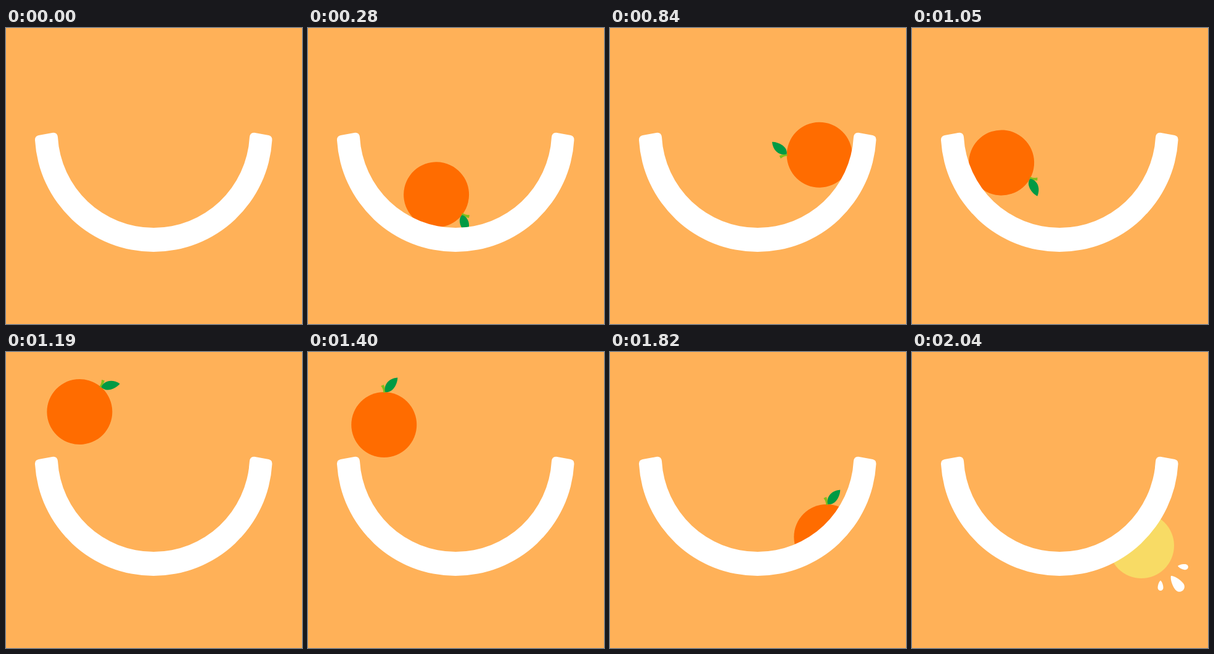
These frames come from a looping animation (480 by 480 pixels, 2.59 s). An HTML page:

```html
<!DOCTYPE html>
<html lang="en">
<head>
<meta charset="utf-8">
<title>Rolling orange</title>
<style>
  html, body { margin: 0; width: 100%; height: 100%; overflow: hidden; background: #ffb158; }
  svg { display: block; width: 100vw; height: 100vh; }
</style>
</head>
<body>
<svg viewBox="0 0 480 480">
  <defs>
    <!-- The fruit shows only above the smile or inside it, the juice only outside -->
    <clipPath id="inside">
      <path d="M0 0H480V168H414A174.5 174.5 0 0 1 65 168H0Z"/>
    </clipPath>
    <clipPath id="outside">
      <path d="M414 168A174.5 174.5 0 0 1 65 168V480H480V168Z"/>
    </clipPath>
    <path id="drop" d="M0 0C.08-.12 .42-.27 .7-.27C1.1-.27 1.1 .27 .7 .27C.42 .27 .08 .12 0 0Z"/>
  </defs>

  <g clip-path="url(#inside)">
    <g id="orange">
      <circle r="53" fill="#ff6c00"/>
      <path fill="#84bd1c" d="M-5-63L-.5-65Q2-60 2-52H-1Q-1-58-5-63Z"/>
      <path fill="#009a44" d="M2-53C-1-62 5-75 22-76.5C22-66 14-51 2-53Z"/>
    </g>
  </g>
  <g clip-path="url(#outside)">
    <circle id="juice" r="53" fill="#f8db65"/>
  </g>
  <path fill="#fff" d="M47 182Q46.5 175.3 53 174L75 170Q83 168.8 84 177
    A155.75 155.75 0 0 0 395 177Q396 168.8 404 170L426 174Q432 175.3 431.5 182
    A192.6 192.6 0 0 1 47 182Z"/>
  <g id="drops" fill="#fff">
    <use href="#drop"/>
    <use href="#drop"/>
    <use href="#drop"/>
  </g>
</svg>
<script>
  const LOOP = 2590, STEP = 70;
  const BURST = 1890, BURST_STEP = 50;

  // The fruit's centre rolls on this arc
  const ARC = { x: 239.5, y: 168, r: 107 };
  const DRIFT = 17;

  // Flights above one end of the smile; each lands in a roll to the other end
  const HOPS = [
    { from: -195, to: 171, side: -1, peak: -60, rollEnd: 440 },
    { from: 440, to: 807, side: 1, peak: 76, rollEnd: 1095 },
    { from: 1095, to: 1459, side: -1, peak: 76, rollEnd: 1790 }
  ];
  // At last the fruit slips behind the smile and turns to juice
  const SLIP = { from: 1680, to: 1870 };
  const JUICE = { x: 372, y: 314 };

  // Time and turn in degrees
  const TURNS = [[70, 0], [280, 126], [560, 472], [1050, 117], [1260, 0], [1400, 0], [1820, 360]];

  // Splash drops: tip x, tip y, angle, length
  const DROPS = [[431, 347, 8, 17], [420, 363, 52, 30.5], [403, 370.5, 90, 16.5]];

  const byId = id => document.getElementById(id);
  const orange = byId('orange'), juice = byId('juice'), drops = byId('drops');

  const part = (t, from, to) => (t - from) / (to - from);
  const mix = (a, b, u) => a + (b - a) * u;

  function fly({ side, peak }, u) {
    const lift = 4 * u * (1 - u);
    return { x: ARC.x + side * (ARC.r + DRIFT * lift), y: mix(ARC.y, peak, lift) };
  }

  function roll({ side }, u) {
    const a = Math.PI * u;
    return { x: ARC.x + side * ARC.r * Math.cos(a), y: ARC.y + ARC.r * Math.sin(a) };
  }

  function place(t) {
    if (t > SLIP.from) {
      const start = place(SLIP.from), u = part(t, SLIP.from, SLIP.to);
      return { x: mix(start.x, JUICE.x, u), y: mix(start.y, JUICE.y, u) };
    }
    const hop = HOPS.find(h => t < h.rollEnd);
    return t < hop.to
      ? fly(hop, part(t, hop.from, hop.to))
      : roll(hop, part(t, hop.to, hop.rollEnd));
  }

  function turnAt(t) {
    const i = TURNS.findIndex(([time]) => t <= time);
    if (i < 1) return 0;
    const [t0, a] = TURNS[i - 1], [t1, b] = TURNS[i];
    return mix(a, b, part(t, t0, t1));
  }

  function show(el, on) {
    el.setAttribute('visibility', on ? 'visible' : 'hidden');
  }

  function drawOrange(time) {
    const t = Math.floor(time / STEP) * STEP;
    const on = t >= STEP && t < BURST;
    show(orange, on);
    if (!on) return;
    const { x, y } = place(t);
    orange.setAttribute('transform', `translate(${x} ${y}) rotate(${turnAt(t)})`);
  }

  function drawSplash(t) {
    const step = Math.min(3, Math.floor((t - BURST) / BURST_STEP));
    show(juice, step >= 0);
    show(drops, step > 0);
    if (step < 0) return;
    const lag = step ? 0 : 15;
    juice.setAttribute('cx', JUICE.x - lag);
    juice.setAttribute('cy', JUICE.y - lag);

    const grow = step / 3;
    const reach = mix(0.8, 1, grow);
    DROPS.forEach(([x, y, angle, size], i) => {
      const dx = mix(JUICE.x, x, reach), dy = mix(JUICE.y, y, reach);
      drops.children[i].setAttribute('transform',
        `translate(${dx} ${dy}) rotate(${angle}) scale(${size * grow})`);
    });
  }

  const start = performance.now();
  function frame() {
    const t = (performance.now() - start) % LOOP;
    drawOrange(t);
    drawSplash(t);
    requestAnimationFrame(frame);
  }
  frame();
</script>
</body>
</html>
```
